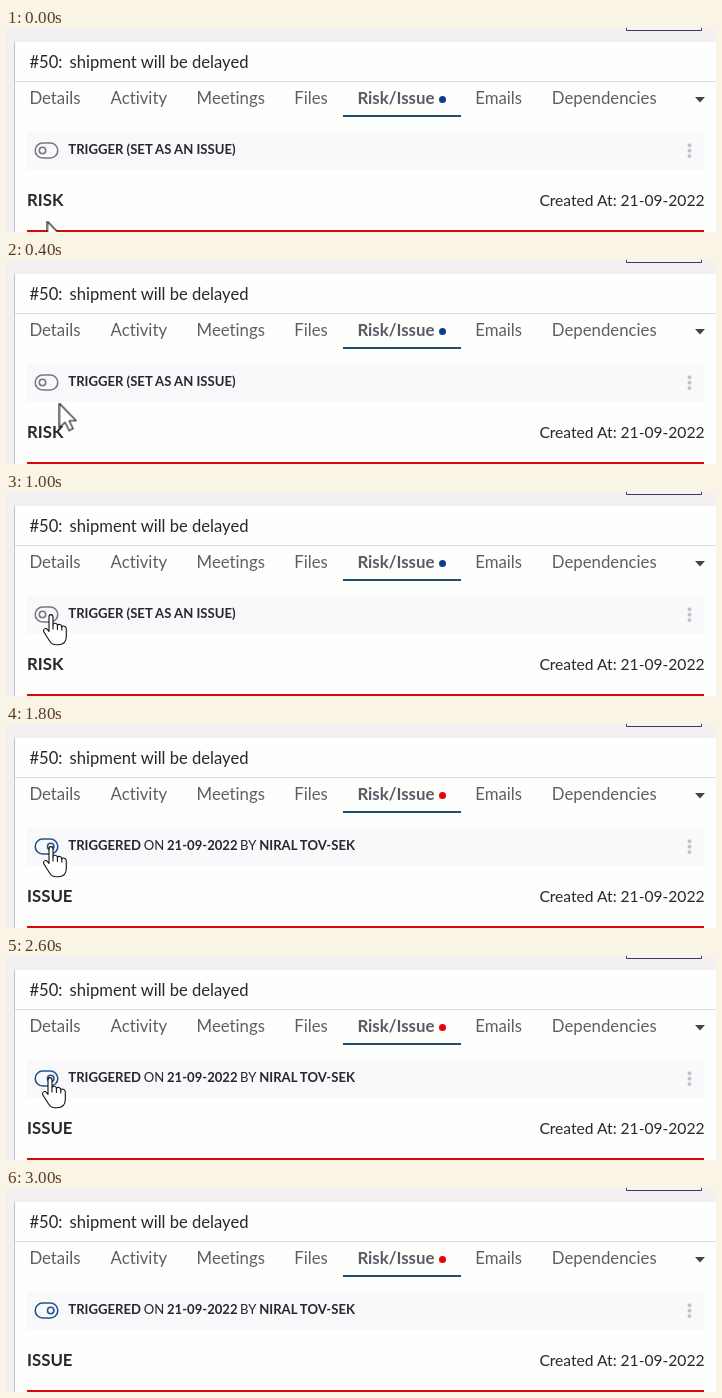
Write an HTML page that moves like this. It is 710 by 204 pixels and loops after 3800 ms.

```html
<!DOCTYPE html>
<html lang="en">
<head>
<meta charset="utf-8">
<title>Risk becomes issue</title>
<style>
html, body { margin: 0; width: 100%; height: 100%; overflow: hidden; background: #fefefd; }
svg { display: block; width: 710px; height: 204px; font-family: Lato, sans-serif; font-variant-ligatures: none; }
.title { font-size: 16.6px; fill: #25282d; }
.tabs { font-size: 16.8px; fill: #5c5f65; }
.tabs .active { font-weight: 700; fill: #575b66; }
.note { font-size: 13.1px; fill: #25282d; }
.status { font-size: 16.8px; fill: #25282d; }
.created { font-size: 15.6px; fill: #25282d; }
.bold { font-weight: 700; }
.toggle { fill: none; stroke-width: 1.6; }
.cursor { fill: #fff; stroke: #111; stroke-width: 1.1; stroke-linejoin: round; }

.risk, .issue, .arrow, .hand { animation: 3800ms step-end infinite; }
.risk { animation-name: risk; }
.issue { animation-name: issue; }
.arrow { animation-name: arrow; }
.hand { animation-name: hand; }

@keyframes risk { 0% { opacity: 1; } 47.368%, 100% { opacity: 0; } }
@keyframes issue { 0% { opacity: 0; } 47.368%, 100% { opacity: 1; } }
@keyframes arrow {
  0% { opacity: 1; transform: translate(41.5px, 193.5px); }
  5.263% { opacity: 1; transform: translate(47.5px, 168.5px); }
  10.526% { opacity: 1; transform: translate(53.5px, 143.5px); }
  15.789% { opacity: 1; transform: translate(49.5px, 132.5px); }
  21.053% { opacity: 0; transform: translate(49.5px, 132.5px); }
  73.684% { opacity: 1; transform: translate(30.5px, 146.5px); }
  78.947%, 100% { opacity: 0; transform: translate(30.5px, 146.5px); }
}
@keyframes hand {
  0% { opacity: 0; transform: translate(37px, 122px); }
  21.053% { opacity: 1; transform: translate(37px, 122px); }
  68.421% { opacity: 1; transform: translate(36px, 121px); }
  73.684%, 100% { opacity: 0; transform: translate(36px, 121px); }
}
</style>
</head>
<body>
<svg viewBox="0 0 710 204">
  <rect width="710" height="204" fill="#f3f0f2"/>
  <path d="M620.5 0V2.5H695.5V0" fill="#f8f6f9" stroke="#3f3856"/>
  <rect x="9" y="14" width="701" height="190" fill="#fefefd"/>
  <path d="M8.5 204V13.5" stroke="#c4c2c4"/>
  <path d="M9 53.5H710" stroke="#dededf"/>

  <g class="title">
    <text x="23.5" y="39.5">#50:</text>
    <text x="63.5" y="39.5">shipment will be delayed</text>
  </g>

  <g class="tabs">
    <text x="23.4" y="76">Details</text>
    <text x="104.5" y="76">Activity</text>
    <text x="190.6" y="76">Meetings</text>
    <text x="288.2" y="76">Files</text>
    <text x="351.4" y="76" class="active">Risk/Issue</text>
    <text x="469.2" y="76">Emails</text>
    <text x="545.8" y="76">Dependencies</text>
  </g>
  <rect x="337" y="87" width="118" height="2" fill="#1d4f72"/>
  <path d="M689 69H699L694 74.5Z" fill="#444"/>

  <rect x="21" y="103" width="677" height="39" rx="2" fill="#f9f9fc"/>
  <g fill="#d4d4d9" stroke="#b0b0b6">
    <circle cx="683.5" cy="117.3" r="1.4"/>
    <circle cx="683.5" cy="122.7" r="1.4"/>
    <circle cx="683.5" cy="128.1" r="1.4"/>
  </g>

  <g class="risk">
    <circle cx="436.5" cy="71.5" r="3.5" fill="#0b3f8c"/>
    <g class="toggle" stroke="#777687">
      <rect x="29.2" y="115" width="22.6" height="15" rx="7.5"/>
      <circle cx="36.5" cy="122.5" r="3.2"/>
    </g>
    <text x="62.3" y="126" class="note bold">TRIGGER (SET AS AN ISSUE)</text>
    <text x="21" y="178" class="status bold">RISK</text>
  </g>

  <g class="issue">
    <circle cx="436.5" cy="71.5" r="3.5" fill="#e8000b"/>
    <g class="toggle" stroke="#20558d">
      <rect x="29.2" y="115" width="22.6" height="15" rx="7.5"/>
      <circle cx="44.7" cy="122.5" r="3.2"/>
    </g>
    <g class="note">
      <text x="62.3" y="126" class="bold">TRIGGERED</text>
      <text x="137.7" y="126">ON</text>
      <text x="161" y="126" class="bold">21-09-2022</text>
      <text x="234" y="126">BY</text>
      <text x="253.2" y="126" class="bold">NIRAL TOV-SEK</text>
    </g>
    <text x="21" y="178" class="status bold">ISSUE</text>
  </g>

  <text x="698.5" y="178" text-anchor="end" class="created">Created At: 21-09-2022</text>
  <rect x="21" y="202" width="677" height="2" fill="#d9060f"/>

  <g class="cursor">
    <path class="arrow" d="M0 0V24L5.5 18.8L9.6 27L13.6 25.2L9.7 17.2H16.6Z"/>
    <g class="hand">
      <path d="M6 17.5V3Q6 .6 8 .6T10 3V10.6Q10.4 9 12.4 9.3T14.4 11.6Q14.9 10 16.9 10.5T18.8 13Q19.5 11.6 21.3 12.2T23.3 14.8V22.5Q23.3 30.8 15 30.8H13Q9 30.8 6.6 27L.9 18Q0 16 1.6 14.9T4.5 15.7Z"/>
      <path d="M10 10.6V15.5M14.4 11.6V16M18.8 13V16.5" fill="none"/>
    </g>
  </g>
</svg>
</body>
</html>
```
